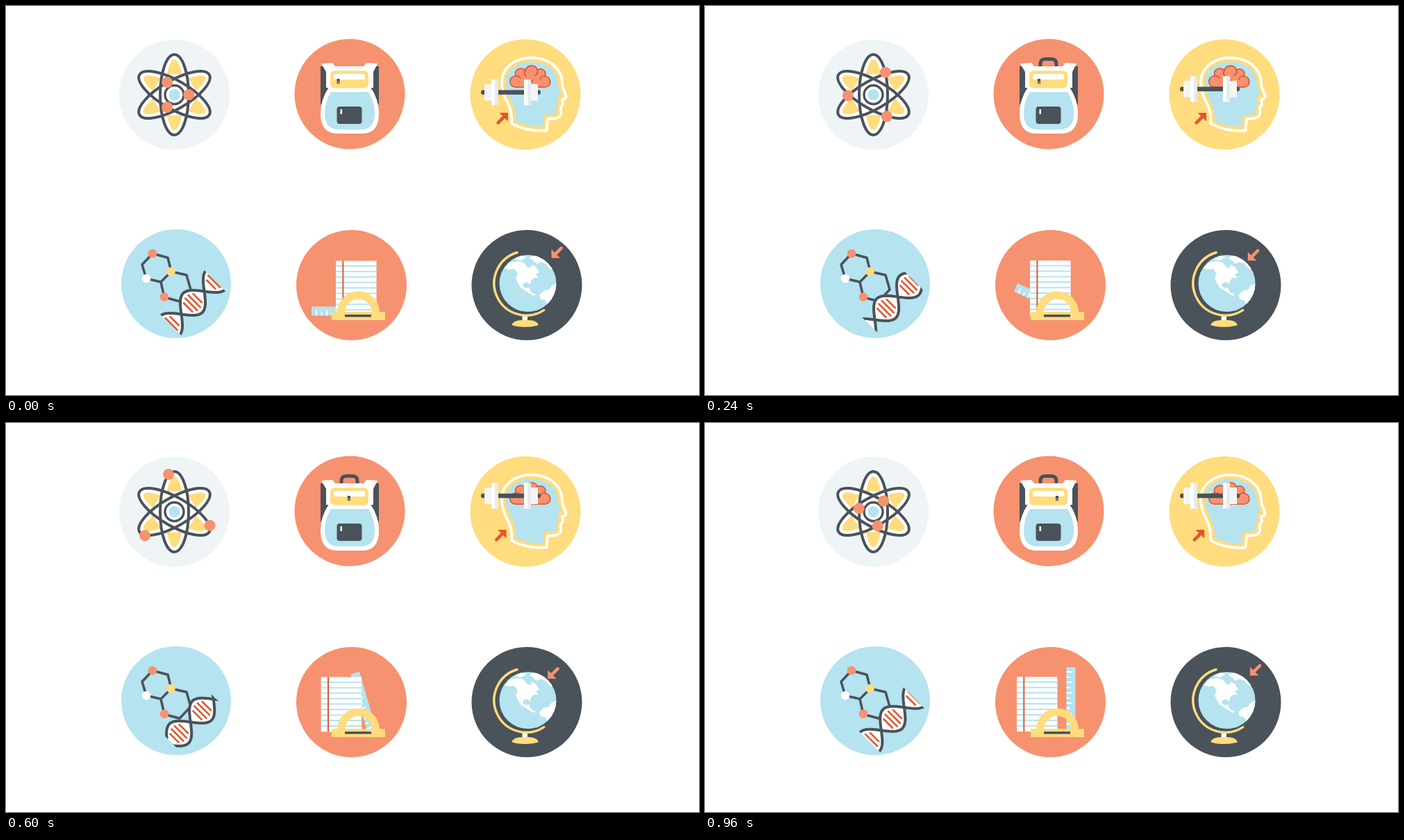
Write an HTML page that moves like this. It is 998 px wide and 561 px high and loops after 1000 ms.

```html
<!DOCTYPE html>
<html lang="en">
<head>
<meta charset="utf-8">
<title>Science icons</title>
<style>
html, body { margin: 0; height: 100%; overflow: hidden; background: #fff; }
svg { display: block; width: 100%; height: 100%; }
.line { fill: none; stroke: #4a525a; }
.dark { fill: #4a525a; }
.coral { fill: #f6926f; }
.gold { fill: #ffdc7d; }
.sky { fill: #b5e3ef; }
.white { fill: #fff; }
.red { fill: #e0572f; }
</style>
</head>
<body>
<svg viewBox="0 0 998 561">
  <defs>
    <clipPath id="strip"><rect x="-45" y="-25" width="90" height="50"/></clipPath>
    <clipPath id="earth"><circle cx="751.5" cy="400" r="41"/></clipPath>
    <!-- points up and right, tip at the origin -->
    <g id="arrow">
      <path d="M0 0H-12.500L0 12.500Z" stroke="none"/>
      <path d="M-5 5L-14.300 14.300" stroke-width="4.600" stroke-linecap="round"/>
    </g>
  </defs>

  <!-- atom -->
  <circle cx="242.5" cy="128" r="79.5" fill="#eff4f6"/>
  <g id="atom" transform="translate(242.5 128)"></g>

  <!-- backpack -->
  <circle class="coral" cx="495" cy="127" r="79.5"/>
  <path id="handle" class="line" stroke-width="5" d="M483 92V84Q483 76.500 490 76.500H499Q506 76.500 506 84V92"/>
  <path class="dark" d="M453 87H537V143L525 122H465L453 143Z"/>
  <path class="white" d="M454 83L470 82L474 87H515L519 82L535 83L529 95V118H461V95Z"/>
  <path class="white" d="M465 117H525Q537 135 537 155Q537 184 513 184H477Q453 184 453 155Q453 135 465 117Z"/>
  <path class="sky" d="M468 124H522Q531 138 531 155Q531 178 511 178H479Q459 178 459 155Q459 138 468 124Z"/>
  <rect class="gold" x="467" y="93.500" width="55" height="25" rx="6"/>
  <rect class="white" x="472" y="98" width="45" height="8" rx="3"/>
  <g id="zip"><path class="dark" d="M-2 105H2V112H-2Z"/><path class="gold" d="M-.5 109H.8V111H-.5Z"/></g>
  <rect class="dark" x="476.500" y="145" width="36" height="25" rx="4"/>
  <path class="white" d="M481.500 149H484V156H481.500Z"/>

  <!-- head -->
  <circle class="gold" cx="748" cy="127.500" r="79.5"/>
  <g id="head"></g>
  <g stroke="#d9542e" stroke-width="1.6" stroke-linecap="round">
    <path class="coral" d="M734 117C723 117 723 101 734 101C731 91 743 87 748 93C750 84 764 84 765 92C773 88 779 95 776 101C787 103 786 117 776 117Z"/>
    <path fill="none" d="M734 101Q739 100 741 104M748 93Q745 98 749 101M765 92Q767 98 762 100M776 101Q770 101 769 106M755 117Q753 109 759 107"/>
  </g>
  <g id="weight">
    <rect class="dark" x="684" y="-3.200" width="86" height="6.400" rx="3"/>
    <path fill="#f4f5f6" d="M689-12H699V12H689ZM756-12H766V12H756Z"/>
    <path class="white" d="M699-18.500H709V18.500H699ZM746-18.500H756V18.500H746Z"/>
    <path fill="#e8ebed" d="M704-18.500H709V18.500H704ZM751-18.500H756V18.500H751Z"/>
  </g>
  <use id="push" href="#arrow" class="red" stroke="#e0572f"/>

  <!-- molecule and helix -->
  <ellipse class="sky" cx="245" cy="400.500" rx="79" ry="78.500"/>
  <path class="line" stroke-width="3.500" stroke-linejoin="round" d="M211 357L233 363L238 383L223 398L202 393L196 373ZM238 383L260 388L266 409L250 426L228 420L223 398"/>
  <circle class="coral" cx="211" cy="357" r="6.300"/>
  <circle class="gold" cx="237.500" cy="383" r="6.300"/>
  <circle class="white" cx="202" cy="393" r="6.300"/>
  <circle class="coral" cx="228" cy="419.500" r="6.300"/>
  <g transform="translate(269 428) rotate(-45)" clip-path="url(#strip)"><g id="helix"></g></g>

  <!-- stationery -->
  <circle class="coral" cx="497.500" cy="402.500" r="79.5"/>
  <g id="ruler"><rect class="sky" x="-6.500" y="-87" width="13" height="95"/></g>
  <g id="paper"><rect class="white" width="58.500" height="79"/></g>
  <path fill="none" stroke="#ffdc7d" stroke-width="11" d="M482.500 442A25 25 0 0 1 532.500 442"/>
  <path class="gold" d="M469 441H546V453H469Z"/>
  <path class="dark" d="M488 445H526V448.500H488Z"/>

  <!-- globe -->
  <circle class="dark" cx="750" cy="402.500" r="79.5"/>
  <path class="white" d="M743.500 446H751V456H743.500Z"/>
  <path class="gold" d="M728 460Q731 453 743 453H752Q764 453 767 460Q760 463 747.500 463Q735 463 728 460Z"/>
  <path fill="none" stroke="#ffdc7d" stroke-width="3.500" stroke-linecap="round" d="M736 355.500A46.300 46.300 0 1 0 774.600 438.600"/>
  <circle class="sky" cx="751.500" cy="400" r="41"/>
  <path class="white" clip-path="url(#earth)" d="M718 378L726 370L737 368L746 370L750 376L755 378L757 373L763 376L768 384L763 387L767 392L760 392L756 396L755 402L751 398L745 400L744 404L749 407L753 406L756 413L763 416L760 418L750 412L741 406L737 399L734 393L737 386L732 379L724 380Z
    M733 365L741 360L750 362L742 367ZM753 363L762 359L776 364L788 378L784 380L777 372L770 369L764 372L759 367ZM768 417L774 411L782 409L786 403L795 400V414L785 429L780 430L776 424L770 423Z"/>
  <use id="point" href="#arrow" class="coral" stroke="#f6926f"/>
</svg>
<script>
const $ = id => document.getElementById(id);
const add = (id, html) => $(id).insertAdjacentHTML('beforeend', html);
const move = (id, x, y, turn = 0) => $(id).setAttribute('transform', `translate(${x} ${y}) rotate(${turn})`);
const range = (n, f) => Array.from({ length: n }, (_, i) => f(i)).join('');

// Atom
const orbits = (rx, ry, style) => range(3, i => `<ellipse rx="${rx}" ry="${ry}" transform="rotate(${i * 60})" ${style}/>`);
add('atom', orbits(20.5, 58, 'class="white"') + orbits(13, 51, 'class="gold"') +
  '<path class="white" d="M17 -29.500L34 0L17 29.500L-17 29.500L-34 0L-17 -29.500Z"/>' +
  orbits(20.5, 58, 'class="line" stroke-width="4"') +
  '<circle class="white" r="13.500" stroke="#4a525a" stroke-width="3.400"/><circle class="sky" r="8"/>' +
  range(3, i => `<g transform="rotate(${i * 120})"><circle class="coral" id="electron${i}" r="8"/></g>`));

// Head
const profile = 'M728 169C729 156 727 148 722 139C716 128 714 118 714 110C714 87 735 74.700 756 74.700C782 74.700 800 90 801 110Q801 117 803 120L806.500 130Q806 134 801 135L802 142L799 146L799 156Q798 161 791 162L780 163L778.500 179.500C760 181 740 177 728 169Z';
add('head', `<path class="sky" d="${profile}" stroke="#ffdc7d" stroke-width="12"/>
  <path d="${profile}" fill="none" stroke="#fff" stroke-width="3.800" stroke-linejoin="round"/>`);

// Helix
const LOBE = 46.7, bulge = u => 19.5 * Math.cos(Math.PI * u / LOBE);
const strand = side => {
  let d = '';
  for (let i = 0; i <= 100; i++) {
    const u = (i / 20 - 1.5) * LOBE;
    d += `${i ? 'L' : 'M'}${u.toFixed(1)} ${(side * bulge(u)).toFixed(1)}`;
  }
  return `<path d="${d}" class="white" stroke="#4a525a" stroke-width="4"/>`;
};
const rungs = range(20, i => {
  const u = (i % 4 - 1.5) * 6.3, h = bulge(u) - 7;
  return `M${u + (Math.floor(i / 4) - 1) * LOBE} ${-h}v${2 * h}`;
});
add('helix', strand(1) + strand(-1) + `<path d="${rungs}" stroke="#e0572f" stroke-width="2.600" stroke-linecap="round"/>`);

// Stationery
add('ruler', `<path stroke="#fff" stroke-width="1.800" d="${range(11, i => `M-6.500 ${i * 7.5 - 80}h${i % 2 ? 5 : 8}`)}"/>`);
add('paper', `<path stroke="#b5e3ef" stroke-width="2" d="${range(9, i => `M0 ${7.5 + i * 7.9}H58.500`)}"/>
  <path stroke="#e0572f" stroke-width="2" d="M10.300 0V79"/>`);

const TIMES = [0, 160, 360, 480, 600, 840, 960, 1000];
function key(t, values) {
  const i = TIMES.findIndex(x => x > t) - 1;
  const a = values[i], b = values[i + 1] ?? a;
  return a + (b - a) * (t - TIMES[i]) / (TIMES[i + 1] - TIMES[i]);
}

function draw(t) {
  const p = t / 1000;
  const a = Math.PI * p - 0.175 * Math.sin(2 * Math.PI * p);
  for (let i = 0; i < 3; i++) move('electron' + i, 20.8 * Math.cos(a), -59 * Math.sin(a));

  move('handle', 0, 14 * Math.max(0, 1 - t / 160) ** 2);
  move('zip', key(t, [478.5, 479, 484, 489, 494, 504, 507]), 0);

  move('weight', 0, key(t, [124.5, 123, 115, 108.5, 105, 105, 105]));
  move('push', 723 - 4 * p, 154);

  move('helix', -LOBE * p, 0);

  const slide = key(t, [0, 0.11, 0.5, 0.69, 0.82, 0.98, 1]);
  move('paper', 475 - 26 * slide, 367.5 - 1.5 * slide);
  move('ruler', 527, key(t, [440, 440, 443, 444, 444, 440, 439]), -90 + 90 * slide);

  const dip = 5.5 * Math.sin(Math.PI * p);
  move('point', 785.5 - dip, 363.5 + dip, 180);
}

function tick(now) {
  draw(Math.floor(now % 1000 / 40) * 40);
  requestAnimationFrame(tick);
}
draw(0);
requestAnimationFrame(tick);
</script>
</body>
</html>
```
